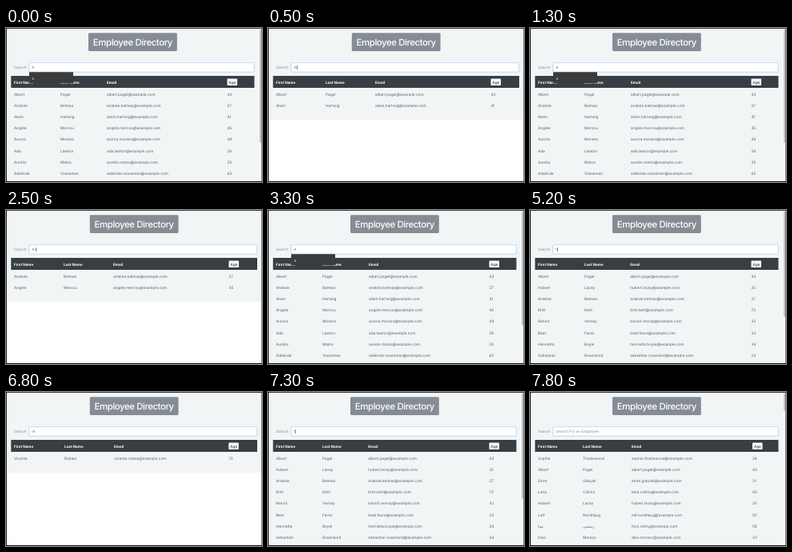
These frames come from a looping animation (320x193 px, 8 s). An HTML page:

```html
<!DOCTYPE html>
<html lang="en">
<head>
<meta charset="utf-8">
<title>Employee Directory</title>
<style>
  html, body { margin: 0; width: 100%; height: 100%; overflow: hidden; background: #fff; }
  svg { display: block; width: 100vw; height: 100vh; }
  text {
    font: 4.7px Inter, "Noto Sans", "DejaVu Sans", sans-serif;
    fill: #5b6066;
    text-rendering: geometricPrecision;
    white-space: pre;
  }
  .title { font-size: 11.4px; font-weight: 500; letter-spacing: -.42px; fill: #fff; text-anchor: middle; }
  .head { font-weight: 700; font-size: 4.6px; fill: #fff; }
  .label { fill: #8a8f94; }
  .query { fill: #6b7177; }
  .hint { fill: #858c94; }
  .age { fill: #212529; }
  .tip { font-size: 4px; fill: #fff; }
</style>
</head>
<body>
<svg id="stage" viewBox="0 0 320 193" preserveAspectRatio="none"></svg>
<script>
const LOOP = 8000;
const LEFT = 6.3, HEAD_Y = 60, HEAD_H = 15, ROW_H = 14.1, ROW_BASE = 85;
const stage = document.getElementById('stage');

// first name, last name, mailbox, age
const people = {
  albert: ['Albert', 'Pagel', 'albert.pagel', 43],
  anatole: ['Anatole', 'Belmas', 'anatole.belmas', 27],
  alwin: ['Alwin', 'Hartwig', 'alwin.hartwig', 41],
  angele: ['Angèle', 'Mercou', 'angele.mercou', 45],
  aurora: ['Aurora', 'Moreira', 'aurora.moreira', 49],
  ada: ['Ada', 'Lawton', 'ada.lawton', 29],
  aurelio: ['Aurélio', 'Matos', 'aurelio.matos', 35],
  adelinde: ['Adelinde', 'Vosseman', 'adelinde.vosseman', 62],
  hubert: ['Hubert', 'Lacey', 'hubert.lacey', 25],
  britt: ['Britt', 'Kehl', 'britt.kehl', 72],
  benoit: ['Benoit', 'Vernay', 'benoit.vernay', 32],
  beat: ['Beat', 'Favre', 'beat.favre', 33],
  henrietta: ['Henrietta', 'Boyle', 'henrietta.boyle', 34],
  sebastian: ['Sebastian', 'Rosenlund', 'sebastian.rosenlund', 24],
  vicente: ['Vicente', 'Robles', 'vicente.robles', 73],
  sophie: ['Sophie', 'Thistlewood', 'sophie.thistlewood', 28],
  emre: ['Emre', 'Gökçeli', 'emre.gokceli', 31],
  lena: ['Lena', 'Collins', 'lena.collins', 66],
  leif: ['Leif', 'Nordhaug', 'leif.nordhaug', 50],
  mina: ['مینا', 'رستمی', 'myn.rstmy', 58],
  davi: ['Davi', 'Moraço', 'davi.moraco', 33]
};

// thumb: lower end of the scrollbar thumb, 0 when the page fits
const screens = {
  A: { rows: 'albert anatole alwin angele aurora ada aurelio adelinde',
       cols: [10, 68, 126, 276.5], thumb: 144, caret: 35, tip: true },
  Al: { rows: 'albert alwin', cols: [10, 72, 134, 278.5], thumb: 0, caret: 36 },
  An: { rows: 'anatole angele', cols: [10, 72, 134, 278.5], thumb: 0, caret: 37.6 },
  t: { rows: 'albert hubert anatole britt benoit beat henrietta sebastian',
       cols: [10, 68, 125.3, 276.5], thumb: 134, caret: 34 },
  te: { rows: 'vicente', cols: [10, 73, 135, 278.3], thumb: 0, caret: 36 },
  '': { rows: 'sophie albert emre lena hubert leif mina davi',
        cols: [10, 66, 127, 278], thumb: 24, caret: 32 }
};

const typed = [[0, 'A'], [500, 'Al'], [1300, 'A'], [2500, 'An'], [3300, 'A'],
  [4200, ''], [5200, 't'], [6300, 'te'], [7000, 't'], [7500, '']];
const blink = [[0, 0], [100, 1], [1000, 0], [1500, 1], [2000, 0], [2500, 1], [3000, 0],
  [3500, 1], [4000, 0], [4500, 1], [5000, 0], [5200, 1], [5700, 0], [6100, 1],
  [6800, 0], [7300, 1], [7800, 0]];

function add(parent, tag, attrs, content) {
  const el = document.createElementNS('http://www.w3.org/2000/svg', tag);
  for (const key in attrs) el.setAttribute(key, attrs[key]);
  if (content !== undefined) el.textContent = content;
  return parent.appendChild(el);
}
const box = (g, x, y, width, height, fill, more) =>
  add(g, 'rect', { x, y, width, height, fill, ...more });
const label = (g, x, y, content, cls = '') =>
  add(g, 'text', { x, y, class: cls }, content);

function build(query, { rows, cols, thumb, tip }) {
  const g = add(stage, 'g', { visibility: 'hidden' });
  const names = rows.split(' ');
  const right = thumb ? 310.5 : 314;
  const mid = (LEFT + right) / 2;

  box(g, 0, 0, 320, thumb ? 193 : HEAD_Y + HEAD_H + names.length * ROW_H + 12, '#f1f5f6');

  box(g, mid - 55.4, 6.2, 110.8, 22.8, '#858c94', { rx: 1.4 });
  label(g, mid, 21.8, 'Employee Directory', 'title');

  label(g, 10, 51.2, 'Search', 'label');
  box(g, 28.2, 43, right - 27.8, 12.6, '#d5e6f8', { rx: 1.5 });
  box(g, 28.9, 43.6, right - 29.2, 11.4, '#fff', { rx: 1, stroke: '#9cc7f2', 'stroke-width': .5 });
  label(g, 32.2, 51.2, query || 'Search For an Employee', query ? 'query' : 'hint');

  box(g, LEFT, HEAD_Y, right - LEFT, HEAD_H, '#383e43');
  ['First Name', 'Last Name', 'Email'].forEach((name, i) => label(g, cols[i], 70.1, name, 'head'));
  box(g, cols[3], 63.6, 12.6, 8.4, '#f8f9fa', { rx: .8 });
  label(g, cols[3] + 2, 69.6, 'Age', 'age');

  names.forEach((key, i) => {
    const [first, last, mail, age] = people[key];
    [first, last, mail + '@example.com', age].forEach((cell, c) =>
      label(g, cols[c], ROW_BASE + i * ROW_H, cell));
  });

  if (tip) {
    box(g, 29, 55.2, 55, 14, '#3a3b3d', { rx: .6 });
    label(g, 32.4, 65, 'A', 'tip');
  }
  if (thumb) {
    box(g, 316, 1, 4, 191, '#f7f8f9');
    box(g, 317, 2, 2.4, thumb - 2, '#c3c5c7', { rx: 1.2 });
  }
  return g;
}

const views = {};
for (const query in screens) views[query] = build(query, screens[query]);
const caret = box(stage, 0, 47, .8, 5, '#6b7177');
box(stage, 0, 0, 320, .8, '#111');
box(stage, 0, 0, .9, 193, '#111');
box(stage, 0, 192, 320, 1, '#111');
box(stage, 319.5, 0, .5, 193, '#111');

const at = (steps, t) => steps.reduce((value, [from, next]) => (t >= from ? next : value), steps[0][1]);
const show = (el, on) => el.setAttribute('visibility', on ? 'visible' : 'hidden');

const start = performance.now();
function draw(now) {
  const t = Math.max(0, now - start) % LOOP;
  const query = at(typed, t);
  for (const key in views) show(views[key], key === query);
  caret.setAttribute('x', screens[query].caret);
  show(caret, at(blink, t));
  requestAnimationFrame(draw);
}
draw(start);
</script>
</body>
</html>
```
